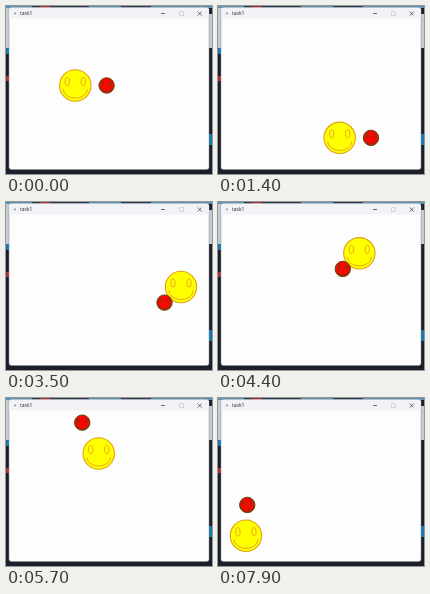
These frames come from a looping animation (206 px wide and 168 px high, 8000 ms). An HTML page:

```html
<!DOCTYPE html>
<html lang="en">
<head>
<meta charset="utf-8">
<title>task1</title>
<style>
  html, body { margin: 0; width: 100%; height: 100%; overflow: hidden; }
  svg { display: block; width: 206px; height: 168px; }
  text { font: 5px "Open Sans", "Noto Sans", sans-serif; fill: #222; }
  #yellow { fill: #ffff00; stroke: #e2a012; --rim: 1.1px; --line: 0.9px; }
  #red { fill: #f80800; stroke: #54480c; --rim: 2px; --line: 1.5px; }
  .rim { stroke-width: var(--rim); }
  .features { fill: none; stroke-width: var(--line); }
</style>
</head>
<body>
<svg viewBox="0 0 206 168">
  <defs>
    <g id="face">
      <circle class="rim" r="15.7"/>
      <g class="features">
        <ellipse cx="-8" cy="-4" rx="2.1" ry="4.1"/>
        <ellipse cx="8" cy="-4" rx="2.1" ry="4.1"/>
        <path d="M-12 3.7A12 8.9 0 0 0 12 3.7"/>
      </g>
    </g>
  </defs>

  <g id="desktop">
    <rect width="206" height="168" fill="#1b1f2c"/>
    <path fill="#c3ccd4" d="M0 0h4v42h-4zM202 8h4v34h-4z"/>
    <path fill="#5d93b8" d="M0 0h206v2H0z"/>
    <path fill="#2b3a4c" d="M26 0h57v2H26zM115 0h30v2h-30z"/>
    <path fill="#1478b0" d="M0 42h4v6h-4zM202 128h4v11h-4z"/>
    <path fill="#a8323c" d="M0 70h4v5h-4zM34 0h10v2H34z"/>
  </g>

  <g id="window">
    <rect x="3" y="1.5" width="200" height="162" rx="2.5" fill="#fdfdfd" stroke="#8b9297" stroke-width="0.5"/>
    <path d="M3.2 12.5V4a2.3 2.3 0 0 1 2.3-2.3h195a2.3 2.3 0 0 1 2.3 2.3v8.5z" fill="#f1f3f6"/>
    <rect x="8" y="6.7" width="2" height="1.4" fill="#8a8f94"/>
    <text x="14" y="9.2">task1</text>
    <g fill="none" stroke="#333" stroke-width="0.7">
      <path d="M155 7.5h4M191.7 5.5l4 4m0-4l-4 4"/>
      <rect x="173.5" y="5.5" width="4" height="4" rx="0.5" stroke="#c4c6c8"/>
    </g>
  </g>

  <use id="yellow" href="#face"/>
  <use id="red" href="#face"/>
</svg>
<script>
  const LOOP = 8000, STEP = 100, SPEED = 3.74;

  const balls = [
    { id: 'yellow', scale: 1, x: 69.3, y: 79.5, left: 19.2, right: 187.6, top: 29.1, bottom: 147.7 },
    { id: 'red', scale: 0.49, x: 100.6, y: 79.5, left: 11.6, right: 195, top: 21.5, bottom: 155.5 }
  ];
  for (const ball of balls) ball.node = document.getElementById(ball.id);

  // Folds straight travel back and forth between two walls.
  function bounce(position, low, high) {
    const span = high - low;
    const offset = (position - low) % (2 * span);
    return low + span - Math.abs(span - offset);
  }

  function draw(time) {
    const travel = Math.floor(time % LOOP / STEP) * SPEED;
    for (const b of balls) {
      const x = bounce(b.x + travel, b.left, b.right);
      const y = bounce(b.y + travel, b.top, b.bottom);
      b.node.setAttribute('transform', `translate(${x.toFixed(2)} ${y.toFixed(2)}) scale(${b.scale})`);
    }
  }

  let start;
  function tick(now) {
    start ??= now;
    draw(now - start);
    requestAnimationFrame(tick);
  }
  draw(0);
  requestAnimationFrame(tick);
</script>
</body>
</html>
```
